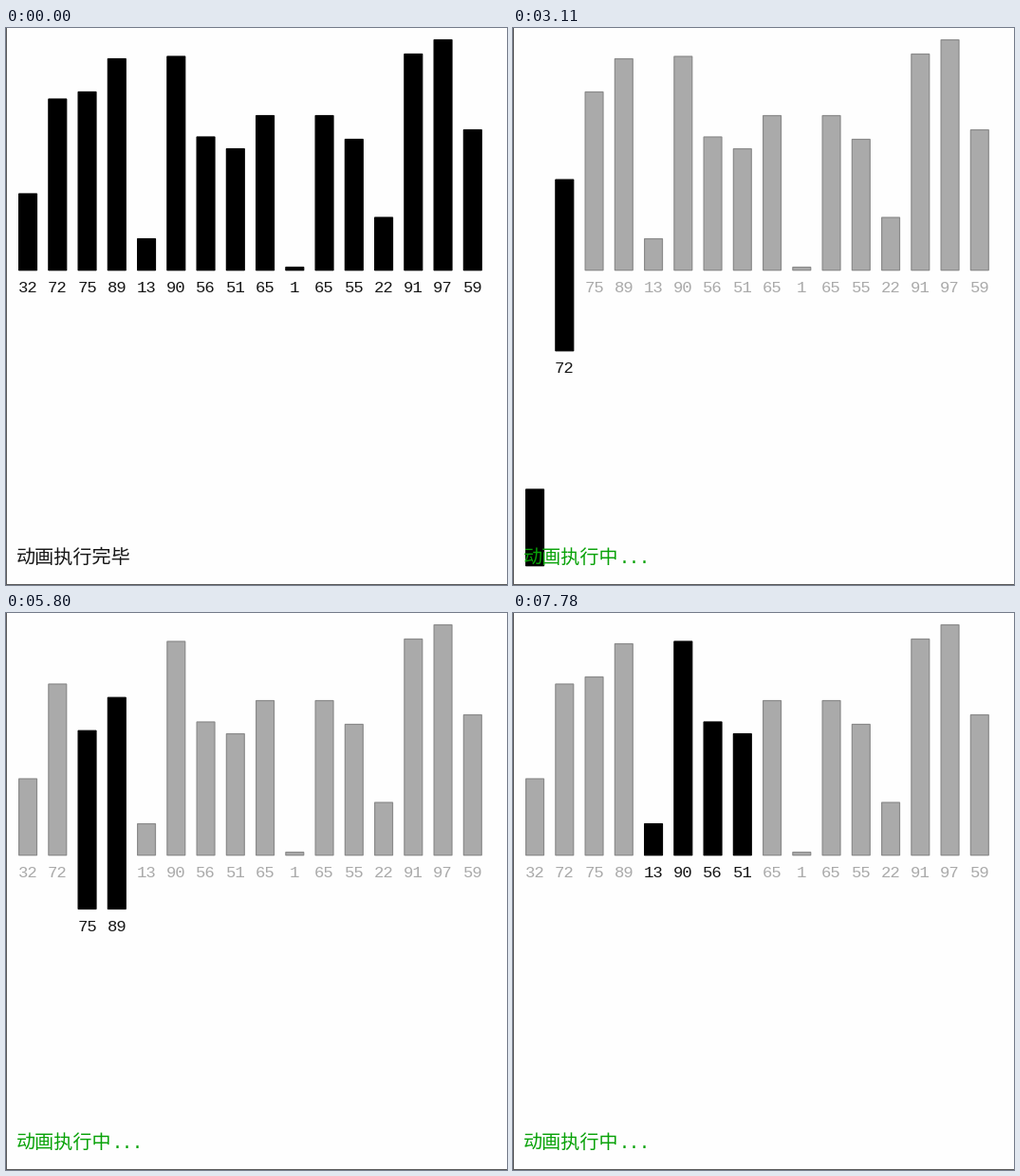
A matplotlib script for the animation above (8000 ms loop, 528 px wide and 588 px high).

```python
import matplotlib.pyplot as plt
from matplotlib.animation import FuncAnimation
from matplotlib.patches import Rectangle

W, H, DPI = 528, 588, 100
LOOP, INTERVAL = 8000, 20
VALUES = [32, 72, 75, 89, 13, 90, 56, 51, 65, 1, 65, 55, 22, 91, 97, 59]

# Layout in pixels
SLOT, LEFT, BAR_W = 31.25, 13, 20.1
BASE, LABEL_BASE, LINE = 256.3, 279.4, 1.2
STEPS, DROP = 11, 312              # a bar travels DROP px in STEPS ticks

# Timing in ms
START, SPLIT, TICK, TURN = 500, 355, 30, 364
REFRESH, PHASE = 134, 26           # moving bars are redrawn at this rate

BLACK, INK, GREY, EDGE, GREEN = "#000000", "#161616", "#aaaaaa", "#8a8a8a", "#08a208"


def merge_sort(lo, hi, t, events):
    """Append (time, lo, hi, merging) events; return the finishing time."""
    events.append((t, lo, hi, False))
    t += SPLIT
    if hi - lo == 1:
        return t
    mid = (lo + hi) // 2
    t = merge_sort(lo, mid, t, events)
    t = merge_sort(mid, hi, t, events)
    events.append((t, lo, hi, True))
    return t + (hi - lo + 1) * TURN


EVENTS = [(0, 0, len(VALUES), False)]
merge_sort(0, len(VALUES), START, EVENTS)


def ticks_since(elapsed):
    return min(max(elapsed // TICK, 0), STEPS)


def steps_down(i, lo, hi, elapsed):
    """Bars sink one after another, then the whole range rises together."""
    return ticks_since(elapsed - (i - lo) * TURN) - ticks_since(elapsed - (hi - lo) * TURN)


def px(size):
    return size * 72 / DPI


fig = plt.figure(figsize=(W / DPI, H / DPI), dpi=DPI, facecolor="#fefefe")
ax = fig.add_axes([0, 0, 1, 1])
ax.set_xlim(0, W)
ax.set_ylim(H, 0)
ax.axis("off")

for x, y, w, h in [(0, 0, 1, H), (0, H - 1, W, 1)]:
    ax.add_patch(Rectangle((x, y), w, h, fc="#5a5a5a", lw=0, antialiased=False))

bars, labels = [], []
for i, v in enumerate(VALUES):
    x = LEFT + SLOT * i
    bar = Rectangle((x + LINE / 2, 0), BAR_W - LINE, 2.5 * v + 1.9 - LINE,
                    lw=px(LINE), joinstyle="miter", snap=False)
    bars.append(ax.add_patch(bar))
    labels.append(ax.text(x + BAR_W / 2, LABEL_BASE, str(v), ha="center",
                          va="baseline", family="Liberation Mono",
                          size=px(17.3)))

status = ax.text(10.5, 565, "", va="baseline", family="Noto Sans CJK JP",
                 size=px(20.1), zorder=5)
dots = ax.text(111.4, 565, "...", va="baseline", family="DejaVu Sans Mono",
               size=px(18.3), color=GREEN, zorder=5)


def draw(frame):
    ms = frame * INTERVAL + INTERVAL / 2
    begun, lo, hi, merging = [e for e in EVENTS if e[0] <= ms][-1]
    elapsed = ms - (ms - PHASE) % REFRESH - begun
    for i, (bar, label) in enumerate(zip(bars, labels)):
        active = lo <= i < hi
        steps = steps_down(i, lo, hi, elapsed) if active and merging else 0
        dy = DROP * steps / STEPS
        bar.set_y(BASE - LINE / 2 - bar.get_height() + dy)
        bar.set_facecolor(BLACK if active else GREY)
        bar.set_edgecolor(BLACK if active else EDGE)
        label.set_y(LABEL_BASE + dy)
        label.set_color(INK if active else GREY)
        label.set_visible(steps < STEPS)
    running = ms >= START
    status.set_text("动画执行中" if running else "动画执行完毕")
    status.set_color(GREEN if running else INK)
    dots.set_visible(running)
    return [*bars, *labels, status, dots]


anim = FuncAnimation(fig, draw, frames=LOOP // INTERVAL, interval=INTERVAL,
                     repeat=True, repeat_delay=0)
plt.show()
```
